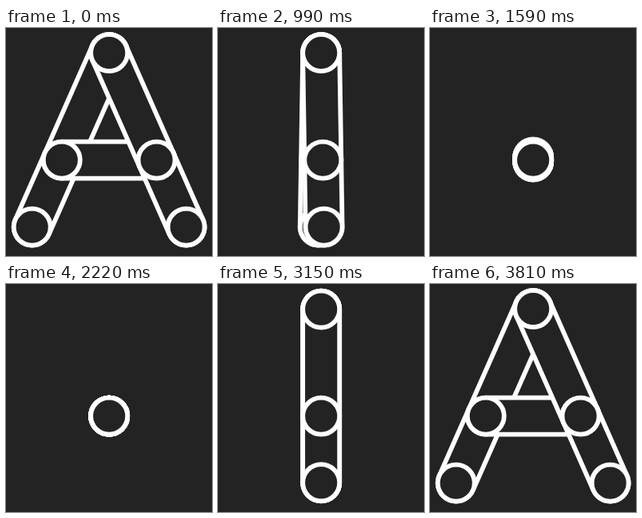
These frames come from a looping animation (258x286 px, 3840 ms). An HTML page with a canvas:

```html
<!DOCTYPE html>
<html lang="en">
<head>
<meta charset="utf-8">
<title>Folding letter A</title>
<style>
  html, body { margin: 0; width: 100%; height: 100%; overflow: hidden; background: #232323; }
  canvas { display: block; }
</style>
</head>
<body>
<canvas id="stage" width="258" height="286"></canvas>
<script>
const LOOP = 3840, STEP = 30, MOVE = 640;
const SHUTTER = 15, SAMPLES = 16;
const BG = '#232323', INK = '#fff';
const CX = 129.2, MID = 165.6, UP = 134.5, DOWN = 84, SPREAD = 96.5;
const RADIUS = 23, LINE = 5.8;

const stage = document.getElementById('stage');
const out = stage.getContext('2d');
const layer = document.createElement('canvas');
layer.width = stage.width;
layer.height = stage.height;
const ctx = layer.getContext('2d');

// cubic-bezier(.8, 0, .2, 1), solved by bisection
function ease(x) {
  if (x <= 0) return 0;
  if (x >= 1) return 1;
  let lo = 0, hi = 1, s;
  for (let i = 0; i < 24; i++) {
    s = (lo + hi) / 2;
    const bx = 2.4 * (1 - s) ** 2 * s + 0.6 * (1 - s) * s * s + s ** 3;
    if (bx < x) lo = s; else hi = s;
  }
  return s * s * (3 - 2 * s);
}

const move = (t, start) => ease((t - start) / MOVE);

function pose(t) {
  return {
    spread: SPREAD * (1 - move(t, 492) + move(t, 3163)),
    reach: 1 - move(t, 1065) + move(t, 2564)
  };
}

function ring([x, y]) {
  ctx.beginPath();
  ctx.arc(x, y, RADIUS, 0, 2 * Math.PI);
  ctx.fillStyle = BG;
  ctx.fill();
  ctx.lineWidth = LINE;
  ctx.strokeStyle = INK;
  ctx.stroke();
}

function bar(a, b) {
  for (const [color, edge] of [[INK, LINE], [BG, -LINE]]) {
    ctx.beginPath();
    ctx.moveTo(...a);
    ctx.lineTo(...b);
    ctx.lineWidth = 2 * RADIUS + edge;
    ctx.strokeStyle = color;
    ctx.stroke();
  }
  ring(a);
  ring(b);
}

function drawPose({ spread, reach }) {
  const top = [CX, MID - UP * reach];
  const foot = side => [CX + side * spread, MID + DOWN * reach];
  const joint = side => [CX + side * spread * UP / (UP + DOWN), MID];
  ctx.fillStyle = BG;
  ctx.fillRect(0, 0, layer.width, layer.height);
  ctx.lineCap = 'round';
  bar(top, foot(-1));
  bar(joint(-1), joint(1));
  bar(top, foot(1));
  ring(joint(1));
}

// Averages several poses across the shutter time for motion blur
function render(t) {
  const a = pose(t - SHUTTER / 2), b = pose(t + SHUTTER / 2);
  const still = a.spread === b.spread && a.reach === b.reach;
  const count = still ? 1 : SAMPLES;
  for (let i = 0; i < count; i++) {
    drawPose(pose(t + SHUTTER * ((i + 0.5) / count - 0.5)));
    out.globalAlpha = 1 / (i + 1);
    out.drawImage(layer, 0, 0);
  }
}

const start = performance.now();

function tick() {
  const t = (performance.now() - start + 5) % LOOP;
  render(Math.floor(t / STEP) * STEP);
  requestAnimationFrame(tick);
}
tick();
</script>
</body>
</html>
```
